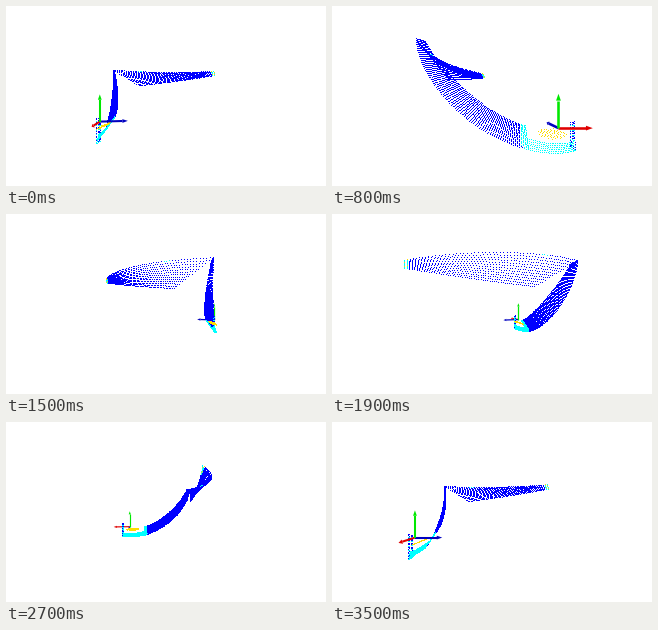
A matplotlib script that plays this animation: 320 by 180 pixels, repeating every 3600 ms.

```python
import numpy as np
import matplotlib.pyplot as plt
from matplotlib.animation import FuncAnimation

W, H, DPI = 320, 180, 100
FRAMES, STEP = 36, 100
FOCAL = 156
CENTRE = (-2.0, 2.3)
PX = 72 / DPI

BLUE, CYAN, YELLOW = "#0000ff", "#00ffff", "#ffdc00"


def project(pts, i):
    """Screen x, y and pixels per unit for points (x, z, height)."""
    turn = 2 * np.pi * i / FRAMES
    yaw = turn + np.radians(10)
    s, c = np.sin(yaw), np.cos(yaw)
    # The orbit breathes and sways three times per turn
    dist = 7.6 + .77 * np.cos(3 * turn - np.radians(51))
    sway = .15 + .4 * np.cos(3 * turn + np.radians(20))
    dx = pts[..., 0] - CENTRE[0]
    dz = pts[..., 1] - CENTRE[1]
    scale = FOCAL / (dist - c * dx + s * dz)
    x = W / 2 + scale * (s * dx + c * dz - sway)
    y = H / 2 - scale * pts[..., 2]
    return x + 0.5, y + 0.5, scale


def bezier(n, *ctrl):
    """n points on the Bezier curve with the given control points."""
    u = np.linspace(0, 1, n)[:, None]
    pts = [np.array(p, float) for p in ctrl]
    while len(pts) > 1:
        pts = [(1 - u) * a + u * b for a, b in zip(pts, pts[1:])]
    return pts[0]


def ruled(a, b, rows):
    """Grid of points between two curves."""
    v = np.linspace(0, 1, rows)[:, None, None]
    return ((1 - v) * a + v * b).reshape(-1, 3)


def disc(n, x, z, rx, rz, h, tilt):
    """Evenly spread points on a tilted ellipse."""
    k = np.arange(n) + .5
    r, a = np.sqrt(k / n), k * np.pi * (3 - np.sqrt(5))
    dz = rz * r * np.sin(a)
    return np.stack([x + rx * r * np.cos(a), z + dz, h + tilt * dz], 1)


# Upright limb
outer = bezier(74, (-4.07, -.18, 1.6), (-4.0, -.12, .3), (-2.4, -.1, -1.2), (-.9, -.05, -1.54))
inner = bezier(74, (-3.85, -.1, 1.55), (-3.3, .2, .5), (-2.0, .45, -.65), (-.9, .35, -.94))
limb = ruled(outer, inner, 19)

# Wide sheet running out to the tip
top = bezier(58, (-4.07, -.18, 1.6), (-4.89, 3.0, 1.58), (-2.55, 5.75, 1.45))
bottom = bezier(58, (-3.62, 1.39, .63), (-3.14, 3.53, .84), (-2.5, 5.75, 1.2))
sheet = ruled(top, bottom, 13)

# Foot: rounded band, upright end and bright core
band = ruled(bezier(28, (-.95, -.04, -1.54), (-.2, -.2, -1.68), (.45, 0, -1.6)),
             bezier(28, (-.95, .1, -1.25), (-.2, -.05, -1.48), (.45, .04, -1.34)), 6)
post = ruled(bezier(18, (.38, .1, -1.55), (.4, .1, -.8)),
             bezier(18, (.47, 0, -1.6), (.46, 0, -.75)), 4)
core = disc(60, -.17, .1, .42, .25, -1.12, .4)

foot = limb[:, 0] > -1.08
tip = sheet[:, 1] > 5.6
clouds = [
    (np.vstack([limb[~foot], sheet[~tip], post]), BLUE),
    (np.vstack([limb[foot], sheet[tip], band, top[14:17], post[::3]]), CYAN),
    (np.vstack([core, sheet[tip][::7]]), YELLOW),
]

ORIGIN = np.array([0, 0, -.92])
AXES = [((1, 0, 0), "#e00000"), ((0, 1, 0), "#0000c0"), ((0, 0, 1), "#00e800")]

fig = plt.figure(figsize=(W / DPI, H / DPI), dpi=DPI, facecolor="white")
ax = fig.add_axes([0, 0, 1, 1])
ax.set_xlim(0, W)
ax.set_ylim(H, 0)
ax.axis("off")

dots = [ax.plot([], [], ",", color=c, zorder=3)[0] for _, c in clouds]
rods = [ax.plot([], [], color=c, solid_capstyle="butt")[0] for _, c in AXES]
cones = [ax.fill([0, 0, 0], [0, 0, 0], color=c, lw=0)[0] for _, c in AXES]


def draw_axis(rod, cone, way, i):
    reach = np.array([0, .8, 1])[:, None]
    x, y, scale = project(ORIGIN + reach * np.array(way), i)
    rod.set_data(x[:2], y[:2])
    rod.set_linewidth(max(1, .075 * scale[0]) * PX)
    along = np.array([x[2] - x[1], y[2] - y[1]])
    side = np.array([-along[1], along[0]]) / max(np.hypot(*along), 1e-6)
    base = np.array([x[1], y[1]])
    half = side * .07 * scale[1]
    cone.set_xy([base - half, base + half, (x[2], y[2])])
    # Hidden behind the cloud while the foot is far away
    order = 4 if scale[0] > 19 else 2
    rod.set_zorder(order)
    cone.set_zorder(order)


def update(i):
    for line, (pts, _) in zip(dots, clouds):
        x, y, _ = project(pts, i)
        line.set_data(x, y)
    for rod, cone, (way, _) in zip(rods, cones, AXES):
        draw_axis(rod, cone, way, i)
    return dots + rods + cones


anim = FuncAnimation(fig, update, frames=FRAMES, interval=STEP,
                     repeat=True, repeat_delay=0, blit=False)
plt.show()
```
